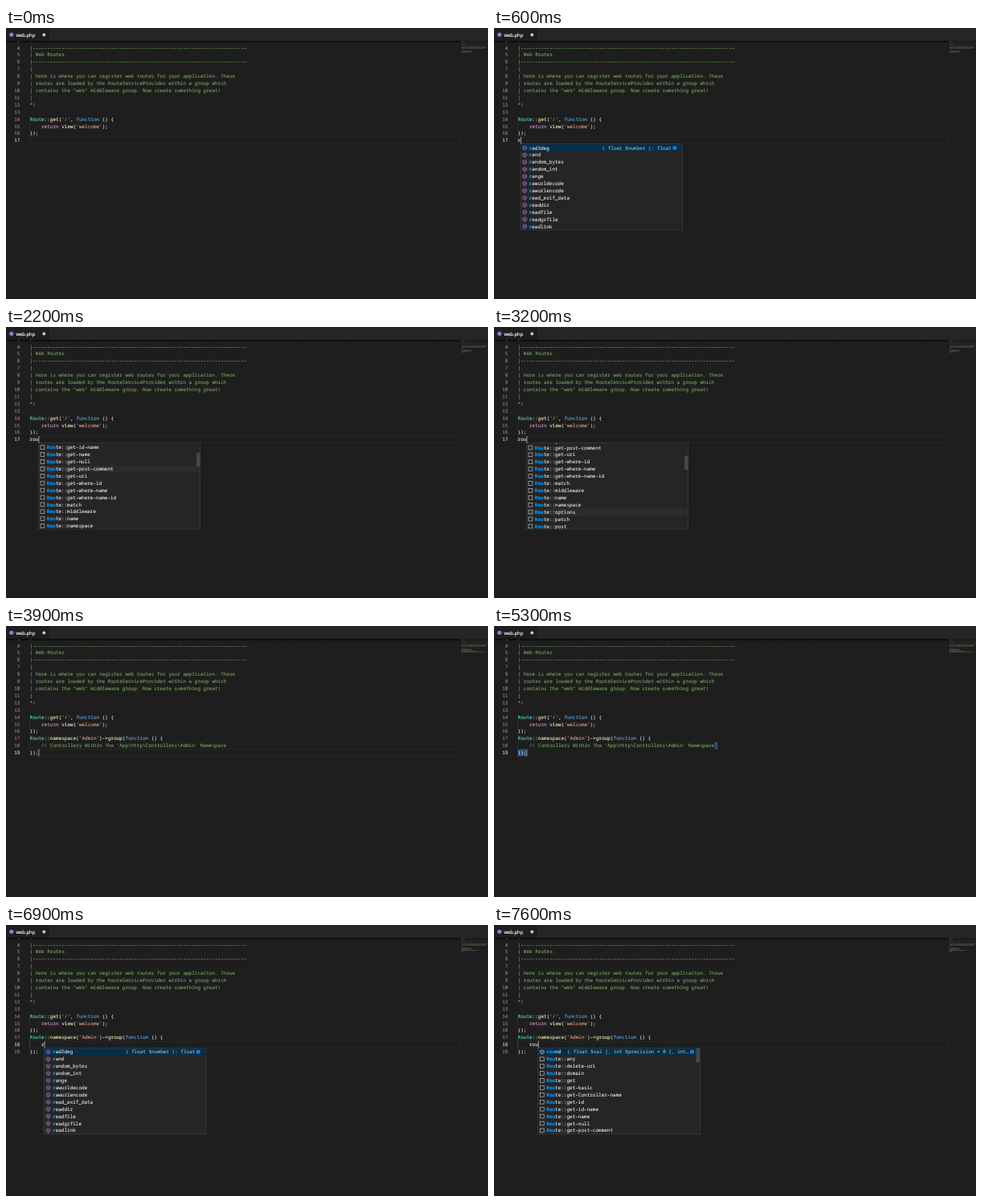
An HTML page with a canvas that plays this animation: 600x338 px, repeating every 8000 ms.

```html
<!DOCTYPE html>
<html lang="en">
<head>
<meta charset="utf-8">
<title>Code editor</title>
<style>
html, body { margin: 0; width: 100%; height: 100%; overflow: hidden; background: #1e1e1e; }
canvas { display: block; }
</style>
</head>
<body>
<canvas width="600" height="338"></canvas>
<script>
const ctx = document.querySelector('canvas').getContext('2d');
const LOOP = 8000, LEFT = 29.6, CHAR = 3.605, LINE = 8.91;
const MONO = '"Noto Sans Mono", "DejaVu Sans Mono", monospace';
const SANS = '"Open Sans", "Noto Sans", sans-serif';
const PLAIN = '#d4d4d4', GREEN = '#6a9955', PURPLE = '#b180d7', MATCH = '#0097fb';

const rule = '|' + '-'.repeat(74);
const header = [
  '<?php', '', '/*', rule, '| Web Routes', rule, '|',
  '| Here is where you can register web routes for your application. These',
  '| routes are loaded by the RouteServiceProvider within a group which',
  '| contains the "web" middleware group. Now create something great!',
  '|', '*/', '',
  "Route::get('/', function () {", "    return view('welcome');", '});'
];
const groupStart = "Route::namespace('Admin')->group(function () {";
const comment = "    // Controllers Within The 'App\\Http\\Controllers\\Admin' Namespace";
const withGroup = inner => [groupStart, inner, '});'];

const functions = ['rad2deg', 'rand', 'random_bytes', 'random_int', 'range', 'rawurldecode',
  'rawurlencode', 'read_exif_data', 'readdir', 'readfile', 'readgzfile', 'readlink'];
const routes = ['round', ...('any delete-uri domain get get-basic get-Controller-name get-id ' +
  'get-id-name get-name get-null get-post-comment get-uri get-where-id get-where-name ' +
  'get-where-name-id match middleware name namespace options patch post prefix put redirect ' +
  'resource view').split(' ').map(name => 'Route::' + name)];
const functionList = { items: functions, detail: '( float $number ): float', total: 12, icon: PURPLE };
const routeList = { items: routes, detail: '( float $val [, int $precision = 0 [, int…', total: 74, icon: '#c5c5c5' };

// Each step changes part of the editor state. Selections are [line, from, to].
const steps = [
  [0, { tail: [''], row: 17, col: 0, caret: false, list: null, typed: 0, scroll: 0, pointer: 0, selected: [], echo: false }],
  [400, { tail: ['r'], col: 1, caret: true }],
  [500, { list: functionList, typed: 1 }],
  [1000, { tail: ['ro'], col: 2, list: routeList, typed: 2 }],
  [1100, { tail: ['rou'], col: 3, typed: 3 }],
  [1800, { scroll: 17.6, pointer: 177, caret: false }],
  [1900, { scroll: 35.3 }],
  [2100, { scroll: 53 }],
  [2200, { scroll: 70.6, caret: true }],
  [2400, { pointer: 187 }],
  [2500, { pointer: 196 }],
  [2600, { pointer: 205 }],
  [2700, { pointer: 217, caret: false }],
  [2800, { pointer: 231 }],
  [3000, { scroll: 79.4 }],
  [3100, { scroll: 88.2 }],
  [3200, { scroll: 97, caret: true }],
  [3300, { scroll: 105.9 }],
  [3500, { pointer: 240 }],
  [3600, { pointer: 225 }],
  [3700, { pointer: 213, caret: false }],
  [3900, { tail: withGroup(comment), row: 19, col: 3, list: null, scroll: 0, pointer: 0, caret: true }],
  [4400, { caret: false }],
  [4900, { row: 18, col: 68, caret: true }],
  [5100, { col: 67, selected: [[18, 67, 68]], echo: true }],
  [5200, { col: 68, selected: [], echo: false }],
  [5300, { row: 19, col: 3, selected: [[18, 68, 69], [19, 0, 3]] }],
  [5500, { row: 18, col: 19, selected: [[18, 19, 68]] }],
  [5700, { col: 9, selected: [[18, 9, 68]] }],
  [5800, { col: 4, selected: [[18, 4, 68]] }],
  [6300, { caret: false }],
  [6900, { tail: withGroup('    r'), col: 5, caret: true, selected: [], list: functionList, typed: 1 }],
  [7600, { tail: withGroup('    rou'), col: 7, list: routeList, typed: 3 }]
];

const columnX = col => LEFT + col * CHAR;
const lineY = row => 140.3 + (row - 17) * LINE;

function box(x, y, w, h, color) {
  ctx.fillStyle = color;
  ctx.fillRect(x, y, w, h);
}

function disc(x, y, r, color) {
  ctx.fillStyle = color;
  ctx.beginPath();
  ctx.arc(x, y, r, 0, 7);
  ctx.fill();
}

// Small text is laid out at ten times its size, unhinted, with a hairline stroke for weight.
function text(str, x, y, color, { size = 6, font = MONO, weight = 400, align = 'left' } = {}) {
  ctx.save();
  ctx.translate(x, y);
  ctx.scale(.1, .1);
  ctx.font = `${weight} ${size * 10}px ${font}`;
  ctx.textRendering = 'geometricPrecision';
  ctx.textAlign = align;
  ctx.fillStyle = ctx.strokeStyle = color;
  ctx.lineWidth = 1.6;
  ctx.lineJoin = 'round';
  ctx.fillText(str, 0, 0);
  ctx.strokeText(str, 0, 0);
  ctx.restore();
}

function tokenColor(word, next) {
  const keywords = { Route: '#4ec9b0', function: '#569cd6', return: '#c586c0' };
  if (word[0] === "'") return '#ce9178';
  return keywords[word] || (/\w/.test(word) && next === '(' ? '#dcdcaa' : PLAIN);
}

function tokens(line) {
  if (line === '<?php') return [[0, line, '#569cd6']];
  if (/^(\||\/\*|\*\/|\s+\/\/)/.test(line)) return [[0, line, GREEN]];
  return [...line.matchAll(/'[^']*'|\w+|[^\w']+/g)].map(m =>
    [m.index, m[0], tokenColor(m[0], line[m.index + m[0].length])]);
}

function drawLine(line, row, state) {
  const y = lineY(row), active = row === state.row;
  text(row, 17.4, y + 2.1, active ? '#c6c6c6' : '#858585', { align: 'right' });
  if (active && !state.selected.length) {
    ctx.strokeStyle = '#282828';
    ctx.lineWidth = .9;
    ctx.strokeRect(LEFT, y - 4.3, 536.5, 8.2);
  }
  if (state.echo) {
    for (const m of line.matchAll(/e/gi)) {
      box(columnX(m.index), y - LINE / 2, CHAR, LINE, 'rgba(173,214,255,.15)');
    }
  }
  if (line.startsWith('    ')) box(LEFT, y - LINE / 2, .5, LINE, active ? '#707070' : '#404040');
  for (const [selectedRow, from, to] of state.selected) {
    if (selectedRow === row) box(columnX(from), y - LINE / 2, (to - from) * CHAR, LINE, '#264f78');
  }
  for (const [col, word, color] of tokens(line)) text(word, columnX(col), y + 2.1, color);
}

function drawMinimap(lines) {
  lines.forEach((line, i) => {
    for (const [col, part, color] of tokens(line)) {
      for (const m of part.matchAll(/\S+/g)) {
        ctx.globalAlpha = m[0].includes('---') ? .1 : .45;
        box(567 + (col + m.index) * .45, 17 + i * .9, m[0].length * .45, .7, color);
      }
    }
  });
  ctx.globalAlpha = 1;
}

function cubeIcon(x, y, color) {
  ctx.strokeStyle = color;
  ctx.lineWidth = .65;
  ctx.beginPath();
  for (let i = 0; i < 6; i++) {
    const angle = (i + .5) * Math.PI / 3;
    ctx.lineTo(x + 2.7 * Math.cos(angle), y + 2.7 * Math.sin(angle));
  }
  ctx.closePath();
  ctx.moveTo(x - 2.3, y - 1.3);
  ctx.lineTo(x, y);
  ctx.lineTo(x + 2.3, y - 1.3);
  ctx.moveTo(x, y);
  ctx.lineTo(x, y + 2.7);
  ctx.stroke();
}

function snippetIcon(x, y) {
  ctx.strokeStyle = '#c5c5c5';
  ctx.lineWidth = .65;
  ctx.strokeRect(x - 2.4, y - 2.4, 4.8, 4.8);
}

function drawList({ list, typed, row, col, scroll, pointer }) {
  const x = columnX(col), top = lineY(row) + 4.7, width = 201.3, height = LINE * 12;
  const hovered = pointer ? Math.floor((pointer - top + scroll) / LINE) : -1;
  box(x - .4, top - .4, width + .8, height + .8, '#454545');
  ctx.save();
  ctx.beginPath();
  ctx.rect(x, top, width, height);
  ctx.clip();
  box(x, top, width, height, '#252526');
  list.items.forEach((name, i) => {
    const y = top + (i + .5) * LINE - scroll;
    if (i === 0 || i === hovered) box(x, y - LINE / 2, width, LINE, i ? '#2a2d2e' : '#062f4a');
    if (name.includes('::')) snippetIcon(x + 5, y);
    else cubeIcon(x + 5, y, list.icon);
    text(name.slice(0, typed), x + 10.4, y + 2.1, MATCH, { weight: 700 });
    text(name.slice(typed), x + 10.4 + typed * CHAR, y + 2.1, PLAIN);
    if (i === 0) {
      text(list.detail, x + 187.7, y + 2.1, '#96a2ab', { align: 'right' });
      disc(x + 191.7, y, 2.5, '#2088d0');
      box(x + 191.4, y - .5, .7, 1.9, '#062f4a');
      box(x + 191.4, y - 1.5, .7, .6, '#062f4a');
    }
  });
  if (list.total > 12) {
    box(x + width - 4.6, top + scroll * 12 / list.total, 4.6, height * 12 / list.total, 'rgba(121,121,121,.4)');
  }
  ctx.restore();
}

function drawTabs() {
  const shadow = ctx.createLinearGradient(0, 16, 0, 19);
  shadow.addColorStop(0, 'rgba(0,0,0,.7)');
  shadow.addColorStop(1, 'rgba(0,0,0,0)');
  box(0, 16, 566, 3, shadow);
  box(0, 0, 600, 16, '#252526');
  box(0, 0, 54, 16, '#1e1e1e');
  disc(6.8, 8.3, 2.6, '#a074c4');
  text('web.php', 12.5, 10.6, '#fff', { size: 5.85, font: SANS });
  disc(47.3, 8.5, 2, '#c5c5c5');
}

function draw(time) {
  const state = Object.assign({}, ...steps.filter(step => step[0] <= time).map(step => step[1]));
  const lines = [...header, ...state.tail];
  box(0, 0, 600, 338, '#1e1e1e');
  lines.forEach((line, i) => i > 1 && drawLine(line, i + 1, state));
  if (state.caret) box(columnX(state.col), lineY(state.row) - LINE / 2, .9, LINE, '#aeafad');
  drawMinimap(lines);
  if (state.list) drawList(state);
  drawTabs();
}

function frame() {
  draw(performance.now() % LOOP);
  requestAnimationFrame(frame);
}
frame();
</script>
</body>
</html>
```
